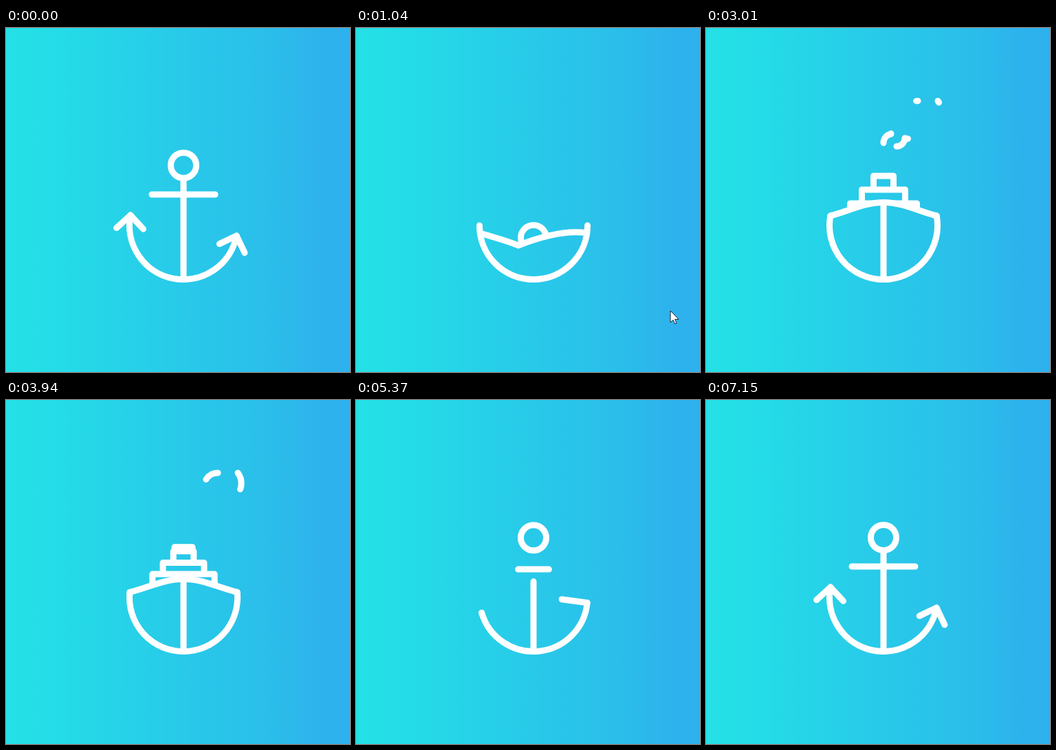
An HTML page for the animation above (7.18 s loop, 500 by 500 pixels).

```html
<!DOCTYPE html>
<html lang="en">
<head>
<meta charset="utf-8">
<title>Anchor and ship</title>
<style>
  html, body { margin: 0; width: 100%; height: 100%; overflow: hidden; }
  svg { display: block; width: 100%; height: 100%; }
  .ink { fill: none; stroke: #fff; stroke-width: 9; stroke-linecap: round; stroke-linejoin: round; }
</style>
</head>
<body>
<svg viewBox="0 0 500 500">
  <defs>
    <linearGradient id="sky">
      <stop offset="0" stop-color="#25e1e6"/>
      <stop offset=".15" stop-color="#24dce7"/>
      <stop offset=".5" stop-color="#28cae9"/>
      <stop offset=".78" stop-color="#2bbdea"/>
      <stop offset=".92" stop-color="#2eb2ed"/>
    </linearGradient>
    <clipPath id="aboveDeck"><path id="deckMask"/></clipPath>
  </defs>
  <rect width="500" height="500" fill="url(#sky)"/>
  <g class="ink">
    <g clip-path="url(#aboveDeck)">
      <path id="cabins"/>
      <rect id="ring"/>
    </g>
    <path id="stem"/>
    <path id="bar"/>
    <path id="hull"/>
    <path id="deck"/>
    <path id="barbs"/>
    <g id="smoke"></g>
  </g>
  <path id="cursor" d="M0 0V17L4 13.4L6.6 19L9 18L6.5 12.4H12Z" fill="#fff" stroke="#223" stroke-width="1"/>
</svg>
<script>
const LOOP = 7180, CX = 258, CY = 287, R = 78.5, BARB = 27.5, RING = 18.5;
const RING_BACK = 4700, SWING_START = 5850, SWING_PERIOD = 867;
const $ = id => document.getElementById(id);
const mix = (a, b, k) => a + (b - a) * k;
const clamp = k => Math.max(0, Math.min(1, k));
const ramp = (t, from, to) => (1 - Math.cos(Math.PI * clamp((t - from) / (to - from)))) / 2;
const rad = deg => deg * Math.PI / 180;
const polar = (deg, r, x = CX, y = CY) => [x + r * Math.cos(rad(deg)), y + r * Math.sin(rad(deg))];
const draw = (id, d) => $(id).setAttribute('d', d);
const show = (id, on) => $(id).setAttribute('visibility', on ? 'visible' : 'hidden');

// Everything the parts share at one moment.
function pose(t) {
  const sail = t - 1750;
  const cornerY = 276 + 9 * Math.cos(2 * Math.PI * sail / 1900) * Math.exp(-Math.max(sail, 0) / 3000);
  const splash = 1 - ramp(t, 1040, 1700);
  const fold = ramp(t, 3750, 4650);
  const roll = ramp(t, 4150, 4680) - ramp(t, 4680, 5200);
  const narrow = ramp(t, 4150, 4680) - ramp(t, 5370, SWING_START);
  const tilt = t < SWING_START
    ? 11 * (1 - ramp(t, 50, 600) - ramp(t, 5050, 5700)) - 24 * roll
    : -11 * Math.cos(2 * Math.PI * (t - SWING_START) / SWING_PERIOD);
  const flare = Math.asin((CY - cornerY) / R) / rad(1) * (1 - splash) * (1 - fold);
  const span = 90 + flare - 11 * narrow;
  return {
    t, splash, fold, roll,
    left: 90 + tilt + span,
    right: 90 + tilt - span,
    lift: (cornerY - 273) / 12,
    mid: [CX - 22 * splash - 5 * roll, mix(mix(cornerY - 19.5, 271, fold), 316, splash)]
  };
}

// Half of the deck line, which turns into the inner barb of the anchor.
function deckHalf({ t, splash, roll, mid }, angle, side) {
  const [px, py] = polar(angle, R);
  const tilt = side < 0 ? angle - 180 : angle;
  const barb = deg => polar(tilt + (side < 0 ? 180 - deg : deg), BARB, px, py);
  const release = ramp(t, 4680, 5370);
  const asBarb = 1 - ramp(t, 100, 850) + ramp(t, 5370, SWING_START);
  const stub = side < 0 ? [px, py] : [px - 37, py - 5];
  const inner = barb(143.5), outer = barb(53.5);
  const end = mid.map((v, i) => mix(mix(v, stub[i], release), inner[i], asBarb));
  const reach = (28 - 8 * Math.max(roll, splash)) * (1 - release);
  const handle = polar(-24 * roll, reach * side, 0, -8 * splash);
  const far = [px, py].map((v, i) => end[i] + mix(handle[i], (v - end[i]) / 3, asBarb));
  const bump = side > 0 ? 12 * (ramp(t, 700, 1040) - ramp(t, 1040, 1500)) : 0;
  const near = [mix(px, end[0], .35), mix(py, end[1], .35) - bump];
  const grown = 1 - ramp(t, 50, 600) + ramp(t, 5370, SWING_START);
  return {
    p: [px, py], end, near, far,
    outer: grown > .01 ? `M${px} ${py}L${mix(px, outer[0], grown)} ${mix(py, outer[1], grown)}` : ''
  };
}

function drawHull(now) {
  const { t, left, right } = now;
  const drop = 8 * (ramp(t, 600, 1040) - ramp(t, 1040, 1500));
  draw('hull', `M${polar(left, R)}A${R} ${R} 0 ${+(left - right > 180)} 0 ${polar(right, R)}`);
  const l = deckHalf(now, left - drop, -1), r = deckHalf(now, right + drop, 1);
  const lCurve = `C${l.near} ${l.far} ${l.end}`, rCurve = `C${r.far} ${r.near} ${r.p}`;
  draw('deck', `M${l.p}${lCurve}M${r.end}${rCurve}`);
  draw('deckMask', `M0 0V${l.p[1]}L${l.p}${lCurve}L${r.end}${rCurve}H500V0Z`);
  draw('barbs', l.outer + r.outer);
}

function drawStem({ t, mid, roll }) {
  const foot = CY + R;
  const y = t < 1040
    ? mix(219, foot, ramp(t, 80, 700))
    : mix(mix(foot, mid[1], ramp(t, 1250, 1700)), 219, ramp(t, 5250, 5750));
  show('stem', y < foot - .5);
  draw('stem', `M${CX - 5 * roll} ${y}L${polar(90 - 28 * roll, R)}`);

  const grown = 1 - ramp(t, 80, 550) + ramp(t, 5150, 5600);
  const half = 46 * grown;
  show('bar', grown > .01);
  draw('bar', `M${CX - half} ${250 - 8 * grown}h${2 * half}`);
}

function drawRing({ t }) {
  show('ring', t < 1250 || t >= RING_BACK);
  const fall = Math.max(t, 140) - 509;
  const round = t < RING_BACK ? 1 : ramp(t, RING_BACK, 5400);
  const y = t < RING_BACK ? 102 + .000717 * fall * fall : mix(266, 200, round);
  const height = mix(4, 2 * RING, round);
  const box = { x: CX - RING, y: y - height / 2, width: 2 * RING, height, rx: RING * round };
  for (const name in box) $('ring').setAttribute(name, box[name]);
}

function drawCabins({ t, lift, fold }) {
  show('cabins', t > 1150 && t < RING_BACK);
  const floor = i => 255 - 7 * lift - i * mix(20, 17, lift);
  let base = mix(300, 268, fold), d = '';
  for (let i = 0; i < 4; i++) {
    const chimney = i === 3;
    const top = chimney ? floor(2) - 15 * Math.max(lift, 0) : floor(i);
    const width = chimney ? 12.5 : 48.5 - 17 * i;
    const rise = ramp(t, 1150 + i * 70, 1530 + i * 70);
    const y = mix(mix(310, top, rise), 264, fold), half = mix(width, 17, fold);
    d += `M${CX - half} ${base}V${y}H${CX + half}V${base}Z`;
    base = y;
  }
  draw('cabins', d);
}

const PUFF_LENGTH = 57, PUFF_SPEED = 0.122;
const TRAILS = [
  'M258 167A13 13 0 0 1 269 154A17 17 0 0 1 289 133A20 20 0 0 1 308 106',
  'M277 172A12 12 0 0 0 289 160A14 14 0 0 0 308 146A26 26 0 0 0 337 106'];
const puffs = [1750, 2840, 4000].flatMap(start => TRAILS.map(d => {
  const path = document.createElementNS('http://www.w3.org/2000/svg', 'path');
  path.setAttribute('d', d);
  $('smoke').append(path);
  return { start, path, length: path.getTotalLength() };
}));

function drawSmoke({ t }) {
  for (const { start, path, length } of puffs) {
    const lead = (t - start) * PUFF_SPEED;
    const from = clamp((lead - PUFF_LENGTH) / 100) * length, to = clamp(lead / 100) * length;
    path.setAttribute('visibility', to - from > .1 ? 'visible' : 'hidden');
    path.setAttribute('stroke-dasharray', `${to - from} 999`);
    path.setAttribute('stroke-dashoffset', -from);
  }
}

function drawCursor({ t }) {
  const enter = ramp(t, 680, 1040), leave = ramp(t, 1100, 1620);
  show('cursor', t > 680 && t < 1620);
  $('cursor').setAttribute('transform',
    `translate(${441 + 16 * enter + 45 * leave} ${500 - 89 * enter + 94 * leave})`);
}

const parts = [drawHull, drawStem, drawRing, drawCabins, drawSmoke, drawCursor];
const began = performance.now();
function tick() {
  const now = pose((performance.now() - began) % LOOP);
  parts.forEach(part => part(now));
  requestAnimationFrame(tick);
}
tick();
</script>
</body>
</html>
```
